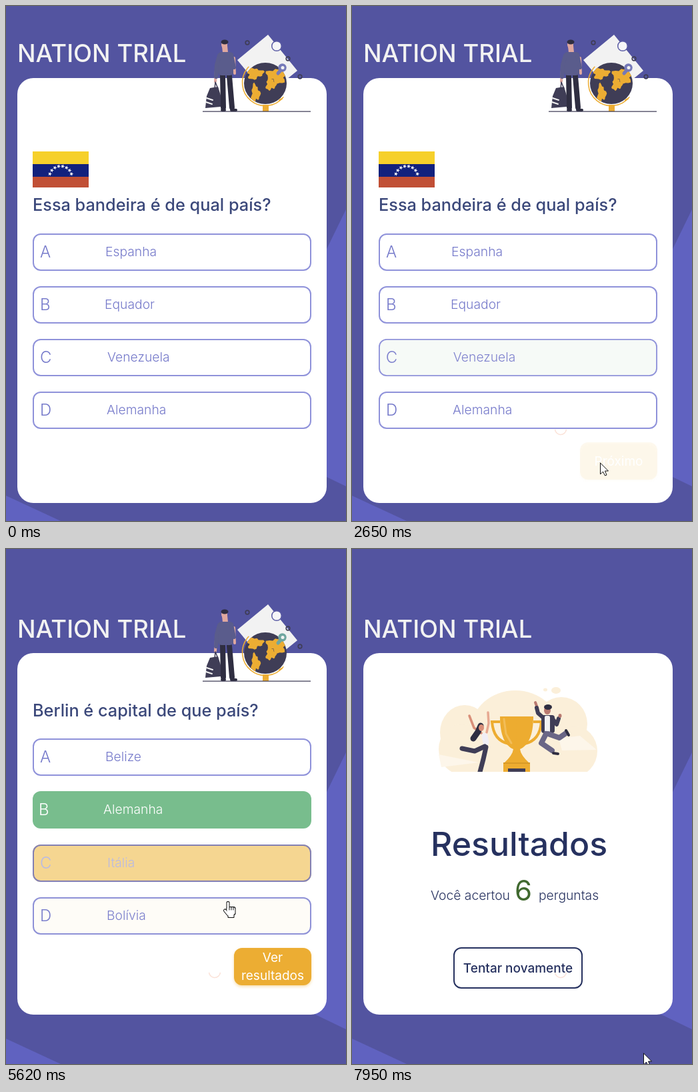
Animation of 510 by 772 pixels, one loop 8 s. Source, as an HTML page with a canvas:

```html
<!DOCTYPE html>
<html lang="pt">
<head>
<meta charset="utf-8">
<title>Quiz</title>
<style>
html, body { margin: 0; width: 510px; height: 772px; overflow: hidden; background: #5354a0; }
canvas { display: block; }
</style>
</head>
<body>
<canvas id="stage" width="510" height="772"></canvas>
<script>
const ctx = document.getElementById('stage').getContext('2d');
const LOOP = 8000, RESULTS_FROM = 7150;
const HOVER_MS = 300, FADE_MS = 400, ROW_PITCH = 79.3, ROW_HEIGHT = 56;
const DARK = '#3f3d56', INK = '#2f2e41', GOLD = '#ecad33', SKIN = '#dfa89f';
const PALE = '#f2f2f2', NAVY = '#26315f', TROUSERS = '#6a6686';
const WHITE = [255, 255, 255], YELLOW = [235, 171, 30], GREEN = [120, 189, 141];
const PURPLE = [117, 121, 202], EDGE = [143, 146, 218], EDGE_HOVER = [118, 110, 140];

const pages = [
  {
    from: 0, cardTop: 108, cardBottom: 745, titleY: 84, artY: 0, questionY: 307, top: 340.55,
    question: 'Essa bandeira é de qual país?', flag: true, pin: '#7579b8',
    answers: ['Espanha', 'Equador', 'Venezuela', 'Alemanha'],
    pick: 2, click: 1150, next: 2380, button: 654, label: ['Próximo']
  },
  {
    from: 3240, cardTop: 156, cardBottom: 698, titleY: 133, artY: 40, questionY: 251, top: 283.95,
    question: 'Berlin é capital de que país?', pin: '#6fa6a0',
    answers: ['Belize', 'Alemanha', 'Itália', 'Bolívia'],
    pick: 1, click: 4990, next: 6290, button: 598, label: ['Ver', 'resultados']
  }
];

// start time, end time and goal of each move; the pointer rests in between
const ENTRY = [330, 742];
const moves = [
  [70, 640, 267, 534], [1190, 1720, 318, 634], [1720, 1850, 335, 639], [1850, 2180, 372, 685],
  [4030, 4690, 256, 391], [5100, 6020, 383, 622], [6890, 7680, 396, 680], [7680, 7950, 437, 756]
];
const clickRings = [[990, 1190], [2180, 2380], [4830, 4990], [6020, 6290]];

const clamp = v => Math.max(0, Math.min(1, v));
const lerp = (a, b, k) => a + (b - a) * k;
const mix = (a, b, k) => a.map((v, i) => lerp(v, b[i], k));
const rgb = c => `rgb(${c.map(Math.round)})`;
const smooth = k => k * k * (3 - 2 * k);

// CSS "ease" timing curve
function ease(x) {
  x = clamp(x);
  if (x === 0 || x === 1) return x;
  const curve = (s, a, b) => 3 * s * (1 - s) ** 2 * a + 3 * s * s * (1 - s) * b + s ** 3;
  let lo = 0, hi = 1;
  for (let i = 0; i < 16; i++) {
    const mid = (lo + hi) / 2;
    if (curve(mid, .25, .25) < x) lo = mid; else hi = mid;
  }
  return curve(lo, .1, 1);
}
const pulse = (t, on, off, span) =>
  ease((Math.min(t, off) - on) / span) * (1 - ease((t - off) / span));

function text(str, x, y, size, color, weight = 300, align = 'left') {
  ctx.font = `${weight} ${size}px Inter, sans-serif`;
  ctx.textAlign = align;
  ctx.fillStyle = color;
  ctx.fillText(str, x, y);
}
function shape(points, fill) {
  ctx.beginPath();
  points.forEach(p => ctx.lineTo(...p));
  ctx.fillStyle = fill;
  ctx.fill();
}
function limb(color, width, ...points) {
  ctx.beginPath();
  points.forEach(p => ctx.lineTo(...p));
  ctx.strokeStyle = color;
  ctx.lineWidth = width;
  ctx.lineCap = ctx.lineJoin = 'round';
  ctx.stroke();
}
function oval(x, y, rx, ry, fill) {
  ctx.beginPath();
  ctx.ellipse(x, y, rx, ry, 0, 0, 7);
  ctx.fillStyle = fill;
  ctx.fill();
}
function ring(x, y, r, color, width, from = 0, to = 2 * Math.PI) {
  ctx.beginPath();
  ctx.arc(x, y, r, from, to);
  ctx.strokeStyle = color;
  ctx.lineWidth = width;
  ctx.stroke();
}
function box(x, y, w, h, r, fill) {
  ctx.beginPath();
  ctx.roundRect(x, y, w, h, r);
  ctx.fillStyle = fill;
  ctx.fill();
}
function frame(x, y, w, h, r, color, width) {
  const d = width / 2;
  ctx.beginPath();
  ctx.roundRect(x + d, y + d, w - width, h - width, r - d);
  ctx.strokeStyle = color;
  ctx.lineWidth = width;
  ctx.stroke();
}
// closed outline whose radius varies with the angle
function radial(x, y, rx, ry, steps, radius, fill) {
  shape(Array.from({ length: steps }, (_, i) => {
    const a = 2 * Math.PI * i / steps, r = radius(a, i);
    return [x + rx * r * Math.cos(a), y + ry * r * Math.sin(a)];
  }), fill);
}
const coast = (x, y, rx, ry, seed) =>
  radial(x, y, rx, ry, 28, a => .9 + .2 * Math.sin(3 * a + seed) + .14 * Math.sin(7 * a + 2 * seed), GOLD);

function drawBackground() {
  box(0, 0, 510, 772, 0, '#5354a0');
  shape([[510, 305], [400, 530], [400, 667], [510, 720]], '#6062c0');
  shape([[0, 734], [82, 772], [0, 772]], '#6062c0');
}

function drawTraveller() {
  limb(SKIN, 4, [342, 78], [343, 101]);
  limb(SKIN, 4, [315, 96], [314, 113]);
  limb(INK, 8, [325, 105], [326, 152]);
  limb(INK, 8, [335, 105], [339, 152]);
  limb(INK, 4, [324, 156], [328, 156]);
  limb(INK, 4, [338, 156], [345, 156]);
  limb(SKIN, 8, [328, 60], [329, 70]);
  box(318, 69, 23, 35, 5, '#5a5c8c');
  limb('#5a5c8c', 6, [320, 74], [316, 88], [315, 106]);
  limb('#5a5c8c', 6, [338, 73], [342, 92]);
  oval(327.5, 58, 4.5, 6, SKIN);
  oval(328, 54, 5.5, 3.5, INK);
  limb(DARK, 1.5, [313, 124], [314, 114], [318, 124]);
  shape([[306, 123], [318, 121], [322, 134], [322, 151], [299, 153], [301, 135]], DARK);
  limb(PALE, 2, [301, 138], [310, 141]);
  limb(PALE, 2, [300, 144], [309, 147]);
}

function drawGlobe(pin) {
  ring(389, 115, 34.5, GOLD, 1.5, .68, 3.9);
  box(385, 148, 9, 10, 0, GOLD);
  limb(GOLD, 2, [410, 141], [414, 139]);
  oval(389, 116, 32, 31, DARK);
  ctx.save();
  ctx.clip();
  coast(373, 101, 13, 9, 2);
  coast(374, 131, 7, 14, 1);
  coast(407, 104, 16, 12, 4);
  coast(397, 117, 8, 10, 1);
  ctx.restore();
  limb(pin, 5, [414, 94], [408, 101]);
  oval(414.5, 92.5, 6.2, 6.2, pin);
  oval(415, 92.5, 2.5, 2.5, PALE);
}

function drawIllustration({ artY, pin }) {
  ctx.save();
  ctx.translate(0, artY);
  shape([[393, 43], [437, 97], [391, 134], [347, 81]], PALE);
  oval(406, 60, 7, 7, '#f6f6f8');
  ring(406, 60, 7.3, '#5c5da5', 1.5);
  for (const [x, y] of [[362, 55], [423, 79], [441, 106]]) ring(x, y, 2.8, DARK, 1.7);
  drawTraveller();
  drawGlobe(pin);
  box(295, 157.5, 162, 1.3, 0, DARK);
  ctx.restore();
}

function drawFlag() {
  ['#c14f35', '#12217d', '#f6d02b'].forEach((c, i) => box(40, 218, 84, [54, 38, 19][i], 0, c));
  for (let i = 0; i < 8; i++) {
    const a = Math.PI * (1.1 + .8 * i / 7);
    const x = 82 + 17 * Math.cos(a), y = 257 + 17 * Math.sin(a);
    radial(x, y, 3.2, 3.2, 10, (_, k) => k % 2 ? .4 : 1, '#fff');
  }
}

function pointerAt(t) {
  if (t < moves[0][0]) return null;
  let at = ENTRY;
  for (const [start, end, ...goal] of moves) {
    if (t > start) at = mix(at, goal, smooth(clamp((t - start) / (end - start))));
  }
  return at;
}

const rowTop = (page, i) => Math.round(page.top + ROW_PITCH * i);
const within = (y, top) => y >= top && y <= top + ROW_HEIGHT;

// spans of time in which the pointer rests on a row
function hoverSpans(page, row) {
  const spans = [];
  let on = null;
  for (let t = page.from; t <= page.next; t += 5) {
    const at = pointerAt(t);
    const inside = at !== null && within(at[1], rowTop(page, row));
    if (inside && on === null) on = t;
    if (!inside && on !== null) {
      spans.push([on, t]);
      on = null;
    }
  }
  return spans;
}
for (const page of pages) page.hovers = page.answers.map((_, i) => hoverSpans(page, i));

function drawOption(page, i, t) {
  const y = rowTop(page, i);
  const hover = Math.max(0, ...page.hovers[i].map(([on, off]) => pulse(t, on, off, HOVER_MS)));
  let fill = mix(WHITE, YELLOW, hover), ink = mix(PURPLE, WHITE, hover);
  let edge = mix(EDGE, EDGE_HOVER, hover), border = 2;
  if (i === page.pick && t >= page.click) {
    const reset = ease((t - page.next) / FADE_MS);
    fill = mix(mix(YELLOW, GREEN, ease((t - page.click) / FADE_MS)), WHITE, reset);
    ink = mix(WHITE, PURPLE, reset);
    edge = EDGE;
    border = 2 * reset;
  }
  box(40, y, 418, ROW_HEIGHT, 12, rgb(fill));
  if (border > 0) frame(40, y, 418, ROW_HEIGHT, 12, rgb(edge), border);
  const shift = border - 2;
  text('ABCD'[i], 51 + shift, y + 36, 24, rgb(ink));
  text(page.answers[i], [149, 148, 152, 151][i] + shift, y + 34, 19.3, rgb(ink));
}

function drawButton(page, t) {
  const alpha = pulse(t, page.click, page.next, FADE_MS);
  if (!alpha) return;
  ctx.save();
  ctx.globalAlpha = alpha;
  ctx.shadowColor = 'rgba(236,172,50,.4)';
  ctx.shadowBlur = 4;
  ctx.shadowOffsetY = 2;
  box(342, page.button, 116, ROW_HEIGHT, 12, GOLD);
  ctx.restore();
  const lines = t >= page.next ? ['Próximo'] : page.label;
  const first = page.button + (lines.length > 1 ? 21 : 35);
  lines.forEach((line, i) => text(line, 400, first + 27 * i, 19, '#fff', 400, 'center'));
}

function drawQuiz(page, t) {
  drawIllustration(page);
  if (page.flag) drawFlag();
  text(page.question, 40, page.questionY, 25.3, '#3b487a', 500);
  page.answers.forEach((_, i) => drawOption(page, i, t));
  drawButton(page, t);
}

function drawCloud() {
  const cloud = '#fbefd9', light = '#fdf6ea';
  oval(169, 275, 37, 41, cloud);
  oval(165, 300, 35, 38, cloud);
  oval(245, 270, 66, 58, cloud);
  oval(314, 262, 39, 40, cloud);
  oval(332, 303, 36, 38, cloud);
  box(150, 280, 200, 54, 0, cloud);
  shape([[130, 308], [190, 320], [134, 327]], light);
  shape([[310, 284], [342, 280], [367, 301], [315, 302]], light);
  oval(290, 211, 3, 2.5, cloud);
  oval(306, 212, 7, 5, cloud);
}

function drawCup() {
  ctx.fillStyle = ctx.strokeStyle = '#edac30';
  ctx.lineWidth = 4;
  for (const side of [-1, 1]) {
    ctx.save();
    ctx.translate(247, 251);
    ctx.scale(side, 1);
    ctx.beginPath();
    ctx.moveTo(25, 8);
    ctx.lineTo(37, 8);
    ctx.quadraticCurveTo(35, 36, 12, 41);
    ctx.stroke();
    ctx.beginPath();
    ctx.moveTo(-.5, 0);
    ctx.lineTo(25, 0);
    ctx.bezierCurveTo(25, 29, 17, 44, 5, 49);
    ctx.quadraticCurveTo(6, 58, 19, 70);
    ctx.lineTo(-.5, 70);
    ctx.fill();
    ctx.restore();
  }
  limb('#f2bd58', 3, [228, 255], [231, 277], [239, 291]);
  box(227, 321, 40, 13, 0, '#edac30');
  box(227, 320, 40, 2, 0, '#d89a27');
  box(234, 329, 26, 5, 0, DARK);
}

function drawWinners() {
  limb('#d98f79', 3.5, [194, 276], [183, 268], [176, 250]);
  limb('#e7a992', 3.5, [202, 275], [205, 261], [204, 245]);
  limb(INK, 9, [193, 265], [189, 274], [182, 284]);
  oval(194, 268, 4, 5, '#d98f79');
  limb('#f0eef5', 9, [199, 280], [201, 290]);
  limb(DARK, 7, [199, 296], [184, 303], [165, 299]);
  limb(DARK, 7, [201, 297], [197, 315], [192, 334]);

  limb('#b97a70', 4, [278, 238], [275, 230]);
  limb(DARK, 6, [287, 253], [279, 246], [277, 238]);
  limb(DARK, 6, [300, 253], [307, 263], [310, 254]);
  oval(312, 250, 2.5, 3, '#b97a70');
  box(284, 249, 20, 27, 4, DARK);
  box(289, 250, 8, 25, 2, PALE);
  oval(293, 242, 5, 6, '#b97a70');
  oval(294, 237, 6, 4, INK);
  limb(TROUSERS, 8, [294, 277], [311, 283], [321, 276]);
  limb(TROUSERS, 8, [291, 277], [284, 291], [300, 302]);
  limb(INK, 4, [321, 272], [325, 279]);
  limb(INK, 4, [302, 306], [309, 307]);
}

function drawResults() {
  ctx.save();
  ctx.beginPath();
  ctx.rect(130, 204, 240, 130);
  ctx.clip();
  drawCloud();
  drawCup();
  drawWinners();
  ctx.restore();
  text('Resultados', 118, 460, 50, NAVY, 450);
  text('Você acertou', 118, 526, 19.3, NAVY);
  text('6', 244, 527, 42, '#40692f', 400);
  text('perguntas', 280, 526, 19.3, NAVY);
  frame(152, 597, 194, 62, 12, NAVY, 2);
  text('Tentar novamente', 249, 635, 19, NAVY, 450, 'center');
}

function drawHand() {
  for (const [grow, color] of [[1, '#111'], [0, '#fff']]) {
    limb(color, 3 + 2 * grow, [-4, 13], [1, 19]);
    box(-1 - grow, -grow, 3 + 2 * grow, 14 + 2 * grow, 2, color);
    box(-1 - grow, 8 - grow, 12 + 2 * grow, 11 + 2 * grow, 3, color);
    box(1 - grow, 15 - grow, 8 + 2 * grow, 8 + 2 * grow, 1, color);
  }
  for (const x of [2.5, 5.5, 8.5]) limb('#111', 1, [x, 8], [x, 12]);
}

function drawArrow() {
  const outline = [[0, 0], [0, 17], [4, 13], [7, 19], [9.5, 18], [7, 12], [12, 12], [0, 0]];
  shape(outline, '#fff');
  limb('#111', 1, ...outline);
}

function overControl(page, t, x, y) {
  if (t >= RESULTS_FROM) return false;
  const active = t >= page.click && t < page.next;
  return page.answers.some((_, i) => within(y, rowTop(page, i)))
    || (active && x >= 342 && within(y, page.button));
}

function drawPointer(page, t) {
  const at = pointerAt(t);
  if (!at) return;
  const [x, y] = at.map(Math.round);
  if (clickRings.some(([a, b]) => t >= a && t < b)) ring(x, y, 10.5, 'rgba(240,120,90,.8)', 2);
  ctx.save();
  ctx.translate(x + .5, y);
  if (overControl(page, t, x, y)) drawHand(); else drawArrow();
  ctx.restore();
}

function draw(t) {
  const page = pages[t >= pages[1].from ? 1 : 0];
  drawBackground();
  text('NATION TRIAL', 17, page.titleY, 36.5, PALE, 500);
  box(17, page.cardTop, 464, page.cardBottom - page.cardTop, 24, '#fff');
  if (t >= RESULTS_FROM) drawResults(); else drawQuiz(page, t);
  // faint trace left by the pointer's ring
  if (t >= 1700) ring(313, 634, 8.5, '#fbe2d8', 1.5, .1, 3.04);
  drawPointer(page, t);
}

function tick() {
  draw(performance.now() % LOOP);
  requestAnimationFrame(tick);
}
tick();
</script>
</body>
</html>
```
